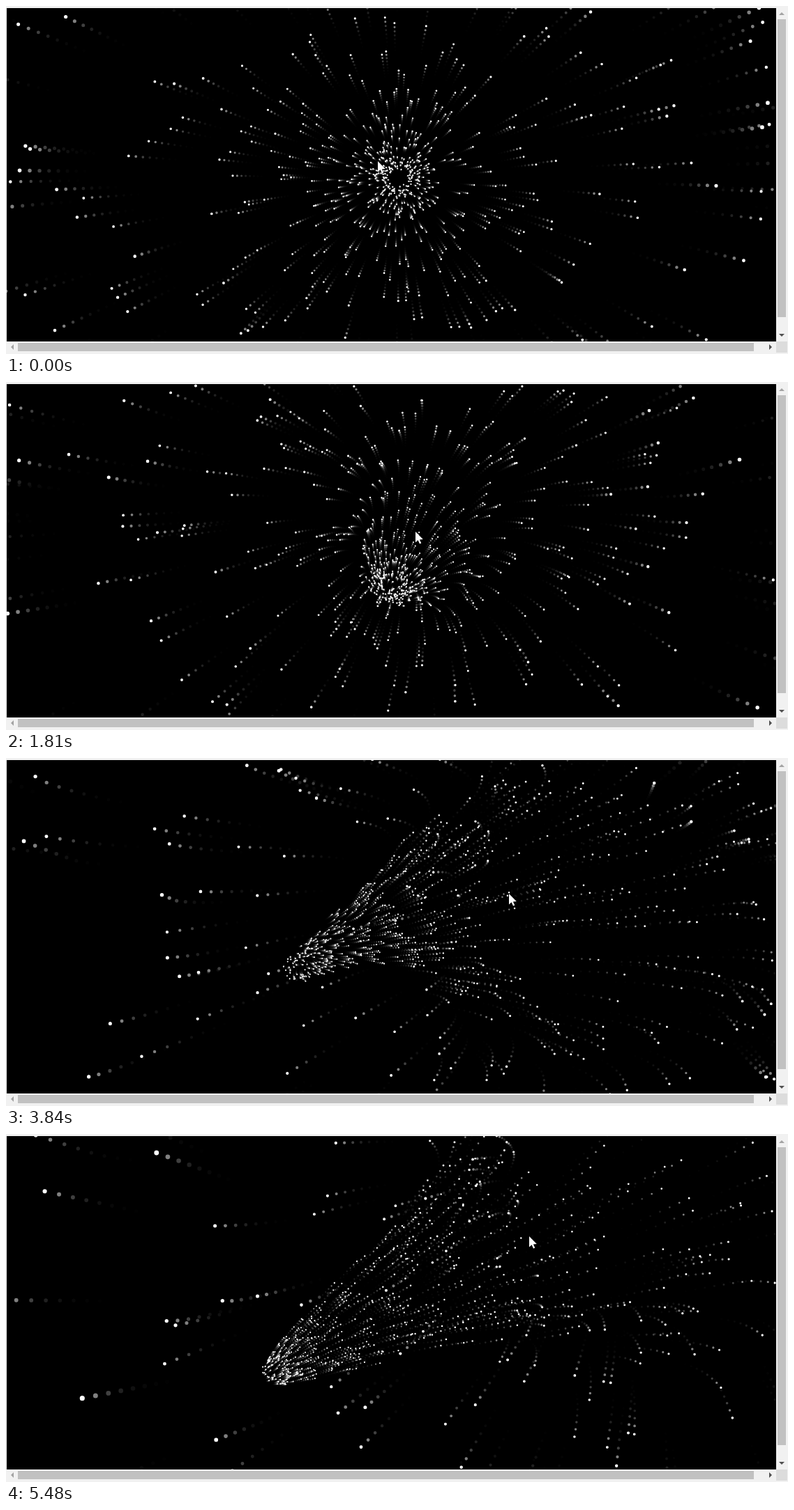
Animation, 1121 px wide and 500 px high, one loop 5560 ms. Source, as an HTML page with a canvas:

```html
<!DOCTYPE html>
<html lang="en">
<head>
<meta charset="utf-8">
<title>Star tunnel</title>
<style>
  html, body { margin: 0; width: 100%; height: 100%; overflow: hidden; background: #f1f1f1; }
  canvas { display: block; }
</style>
</head>
<body>
<canvas id="stage" width="1121" height="500"></canvas>
<script>
const ctx = document.getElementById('stage').getContext('2d');
const TAU = Math.PI * 2;
const LOOP = 5560;
const COUNT = 850;
const LIFE = 2.52;      // seconds from the far end to past the viewer
const GROWTH = 1.65;    // exponential growth of the ring radius per second
const STEP = 1 / 60;    // spacing of the ghosts in a trail
const GHOSTS = 7;
const R0 = 15;
const BAND = 0.92;      // log-radius between two bend points

// Tunnel axis: time, then x,y at five depths from far to near
const BENDS = [
  [0,    562, 248, 561, 247, 560, 247, 556, 244, 552, 242],
  [0.7,  561, 249, 561, 248, 559, 247, 556, 244, 552, 242],
  [1.81, 552, 292, 565, 275, 600, 220, 600, 220, 560, 250],
  [3.05, 518, 165, 543, 215, 588, 325, 600, 365, 600, 240],
  [3.84, 415, 305, 510, 250, 650, 200, 850, 225, 690, 370],
  [4.78, 385, 340, 452, 305, 640, 190, 890, 160, 800, 250],
  [5.48, 385, 343, 455, 300, 645, 195, 910, 60, 890, 200]
];

// Pointer tip: time, x, y
const POINTER = [
  [0, 533, 223], [1.18, 533, 223], [1.81, 587, 215],
  [3.05, 624, 335], [3.84, 721, 195], [4.7, 750, 147], [5.56, 750, 147]
];

// Picture start times: 80 ms each, a few last 70 ms
const SHORT = [0, 4, 19, 26, 29, 34, 37, 44, 51, 59, 63, 67];
const starts = [0];
for (let i = 0; i < 70; i++) starts.push(starts[i] + (SHORT.includes(i) ? 70 : 80));

let seed = 9241;
function random() {
  seed = (seed * 16807) % 2147483647;
  return seed / 2147483647;
}

const stars = Array.from({ length: COUNT }, () => ({
  angle: random() * TAU,
  phase: random() * LIFE,
  scale: 0.75 + random() * 0.55
}));

const clamp = (v, lo, hi) => Math.max(lo, Math.min(hi, v));

function segment(keys, t) {
  let i = 0;
  while (i < keys.length - 2 && t >= keys[i + 1][0]) i++;
  return i;
}

function slope(keys, i, c) {
  const a = keys[Math.max(0, i - 1)], b = keys[Math.min(keys.length - 1, i + 1)];
  return (b[c] - a[c]) / (b[0] - a[0]);
}

function hermite(p, q, m, n, s) {
  const s2 = s * s, s3 = s2 * s;
  return p * (2 * s3 - 3 * s2 + 1) + m * (s3 - 2 * s2 + s) +
         q * (3 * s2 - 2 * s3) + n * (s3 - s2);
}

function axisAt(t) {
  t = clamp(t, 0, 5.55);
  const i = segment(BENDS, t);
  const a = BENDS[i], b = BENDS[i + 1], span = b[0] - a[0];
  const s = Math.min(1, (t - a[0]) / span);
  const axis = [];
  for (let c = 1; c < a.length; c++) {
    axis.push(hermite(a[c], b[c], slope(BENDS, i, c) * span, slope(BENDS, i + 1, c) * span, s));
  }
  return axis;
}

function axisPoint(axis, depth, c) {
  const d = clamp(depth, 0, 4), i = Math.min(3, Math.floor(d));
  const at = k => axis[clamp(k, 0, 4) * 2 + c];
  return hermite(at(i), at(i + 1), (at(i + 1) - at(i - 1)) / 2, (at(i + 2) - at(i)) / 2, d - i);
}

function drawStars(t) {
  for (let k = GHOSTS; k >= 0; k--) {
    const lag = k * STEP, axis = axisAt(t - lag);
    const tone = Math.round(255 * 0.5 ** k);
    ctx.fillStyle = `rgb(${tone},${tone},${tone})`;
    ctx.beginPath();
    for (const star of stars) {
      const total = t + star.phase;
      const cycle = Math.floor(total / LIFE);
      const age = total - cycle * LIFE - lag;
      if (age < 0) continue;
      const grow = age * GROWTH;
      const ring = R0 * Math.exp(grow), r = ring * star.scale;
      const angle = star.angle + cycle * 2.4;
      const x = axisPoint(axis, grow / BAND, 0) + r * Math.cos(angle);
      const y = axisPoint(axis, grow / BAND, 1) + r * Math.sin(angle);
      if (x < -5 || x > 1110 || y < -3 || y > 488) continue;
      const size = 1 + 0.0027 * ring;
      ctx.moveTo(x + size, y);
      ctx.arc(x, y, size, 0, TAU);
    }
    ctx.fill();
  }
}

function rect(color, x, y, w, h) {
  ctx.fillStyle = color;
  ctx.fillRect(x, y, w, h);
}

function poly(color, points) {
  ctx.fillStyle = color;
  ctx.beginPath();
  points.forEach(([x, y]) => ctx.lineTo(x, y));
  ctx.closePath();
  ctx.fill();
}

function drawBars() {
  rect('#f1f1f1', 0, 0, 1121, 3);
  rect('#f1f1f1', 0, 0, 1, 500);
  rect('#f1f1f1', 1104, 3, 17, 480);
  rect('#f1f1f1', 0, 482, 1121, 18);
  rect('#dcdcdc', 1104, 482, 16, 16);
  rect('#c1c1c1', 1106, 19, 12, 428);
  rect('#c1c1c1', 17, 484, 1055, 12);
  poly('#a3a3a3', [[1108, 13], [1112, 9], [1116, 13]]);
  poly('#505050', [[1108, 471], [1116, 471], [1112, 475]]);
  poly('#a3a3a3', [[11, 486], [7, 490], [11, 494]]);
  poly('#505050', [[1094, 486], [1098, 490], [1094, 494]]);
}

function drawPointer(t) {
  const i = segment(POINTER, t), a = POINTER[i], b = POINTER[i + 1];
  const s = clamp((t - a[0]) / (b[0] - a[0]), 0, 1), e = s * s * (3 - 2 * s);
  ctx.save();
  ctx.translate(a[1] + (b[1] - a[1]) * e, a[2] + (b[2] - a[2]) * e);
  ctx.strokeStyle = '#000';
  ctx.lineWidth = 2;
  poly('#fff', [[0, 0], [0, 15.5], [3.6, 12.2], [6, 17.6], [8.3, 16.6], [5.9, 11.4], [10.8, 11]]);
  ctx.globalCompositeOperation = 'destination-over';
  ctx.restore();
}

function draw(now) {
  const ms = now % LOOP;
  let i = starts.length - 1;
  while (starts[i] > ms) i--;
  const t = starts[i] / 1000;
  rect('#000', 0, 0, 1121, 500);
  drawStars(t);
  drawBars();
  drawPointer(t);
}

let begin = null;
function tick(now) {
  if (begin === null) begin = now;
  draw(now - begin);
  requestAnimationFrame(tick);
}
draw(0);
requestAnimationFrame(tick);
</script>
</body>
</html>
```
